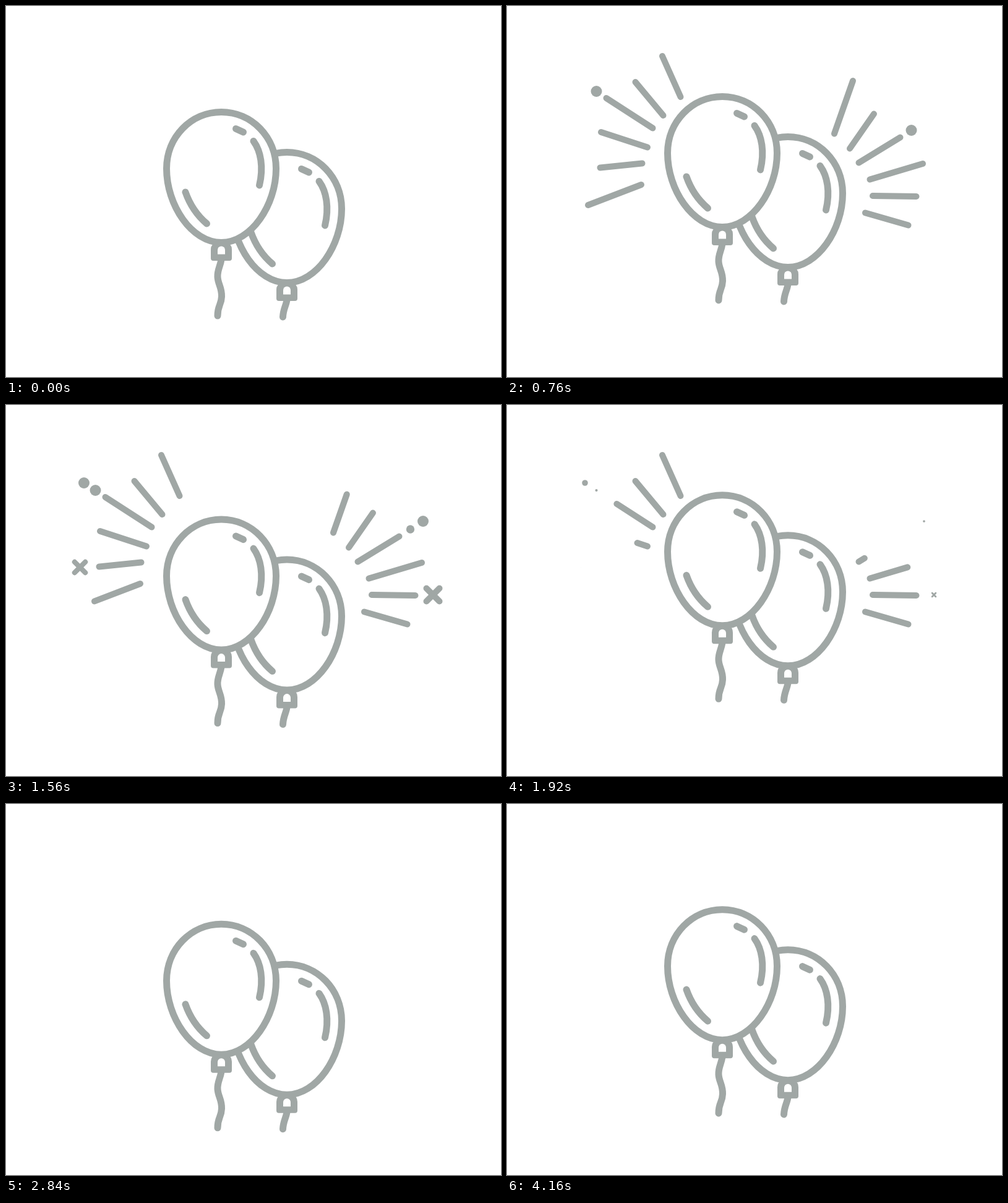
Recreate the animation shown at these times as an HTML page with a canvas. Size 800x600 px, loop 4.2 s.

```html
<!DOCTYPE html>
<html lang="en">
<head>
<meta charset="utf-8">
<title>Balloons</title>
<style>
html, body { margin: 0; width: 100%; height: 100%; overflow: hidden; background: #fff; }
canvas { display: block; }
</style>
</head>
<body>
<canvas id="stage" width="800" height="600"></canvas>
<script>
const ctx = document.getElementById('stage').getContext('2d');
const LOOP = 4200, STEP = 40, GREY = '#a0a7a5';

// Height of the balloons over time: [ms, offset]
const bob = [[0, 0], [660, -28], [1365, 25.7], [2000, -28], [2735, 25.7], [3483, -28], [4240, 0]];

// Rays run from the inner to the outer end, in order of appearance
const leftRays = [
  [217, 289, 131, 322], [218.5, 254.5, 150.5, 261.5], [227, 228.5, 152, 204],
  [235.5, 197.5, 160.5, 149], [252.5, 177, 207.5, 123], [280.5, 147, 251, 81]
];
const rightRays = [
  [529, 206.5, 559, 121], [554, 230.5, 593, 174.5], [568.5, 253.5, 635.5, 212.5],
  [586.5, 280.5, 672, 255], [591, 307, 661.5, 308], [579, 334.5, 648.5, 354.5]
];

const dots = [
  { x: 144.5, y: 138, start: 420, end: 1590 },
  { x: 126, y: 126, start: 800, end: 1690 },
  { x: 653.5, y: 201, start: 420, end: 1400 },
  { x: 674, y: 188, start: 800, end: 1580 }
];
const crosses = [
  { x: 119.5, y: 262.5, start: 920, end: 1420 },
  { x: 690, y: 307, start: 880, end: 1580 }
];

const egg = new Path2D('M259.5 263C259.5 212 299 171.5 348 171.5S436.5 212 436.5 263C436.5 322 396 382.5 348 382.5S259.5 322 259.5 263Z');
const shine = new Path2D('M371.5 198.5L383.5 204M400 218.5C412 235 416.5 261 409.5 290M290 301C297 321 308 338 324.5 352');
const knot = new Path2D('M331 394Q331 384 340 383H356Q365 384 365 394V408Q365 412 361 412H335Q331 412 331 408Z');
const hole = new Path2D('M342 401.5V394.5a6 6 0 0 1 12 0V401.5Z');
const longTail = new Path2D('M348 410C346 422 341.5 427 342 438C342.5 450 349 455 348.5 470C348 484 342 484 342 501');
const shortTail = new Path2D('M348 410C347 419 342 425 341.5 438');

const smooth = p => {
  p = Math.min(1, Math.max(0, p));
  return p * p * (3 - 2 * p);
};
const ramp = (t, start, length) => smooth((t - start) / length);
const shown = (t, start, grow, end, shrink) => ramp(t, start, grow) - ramp(t, end, shrink);

function bobAt(t) {
  const i = bob.findIndex(k => k[0] > t);
  const [t0, y0] = bob[i - 1], [t1, y1] = bob[i];
  return y0 + (y1 - y0) * smooth((t - t0) / (t1 - t0));
}

function line(x0, y0, x1, y1) {
  ctx.beginPath();
  ctx.moveTo(x0, y0);
  ctx.lineTo(x1, y1);
  ctx.stroke();
}

function drawRays(rays, t, end, gap) {
  rays.forEach(([x0, y0, x1, y1], i) => {
    const s = shown(t, i * 50, 290, end + i * gap, 290);
    if (s > 0.001) line(x0, y0, x0 + (x1 - x0) * s, y0 + (y1 - y0) * s);
  });
}

function drawDot(d, t) {
  const s = shown(t, d.start, 300, d.end, 480);
  if (s <= 0.001) return;
  ctx.beginPath();
  ctx.arc(d.x, d.y, 9 * s, 0, Math.PI * 2);
  ctx.fill();
}

function drawCross(c, t) {
  const s = shown(t, c.start, 340, c.end, 520);
  if (s <= 0.001) return;
  ctx.save();
  ctx.translate(c.x, c.y);
  ctx.scale(s, s);
  line(-10.5, -10.5, 10.5, 10.5);
  line(-10.5, 10.5, 10.5, -10.5);
  ctx.restore();
}

function drawBalloon(x, y, tail) {
  ctx.save();
  ctx.translate(x, y);
  ctx.lineWidth = 11;
  ctx.stroke(tail);
  ctx.fill(knot);
  ctx.fillStyle = '#fff';
  ctx.fill(egg);
  ctx.stroke(egg);
  ctx.fill(hole);
  ctx.stroke(shine);
  ctx.restore();
}

function draw(t) {
  ctx.fillStyle = '#fff';
  ctx.fillRect(0, 0, 800, 600);
  ctx.fillStyle = ctx.strokeStyle = GREY;
  ctx.lineCap = ctx.lineJoin = 'round';
  ctx.lineWidth = 10;
  drawRays(leftRays, t, 1492, 113);
  drawRays(rightRays, t, 1460, 119);
  dots.forEach(d => drawDot(d, t));
  crosses.forEach(c => drawCross(c, t));
  const y = bobAt(t);
  drawBalloon(106, y + 65, shortTail);
  drawBalloon(0, y, longTail);
}

const begin = performance.now();
function tick() {
  const t = (performance.now() - begin) % LOOP;
  draw(Math.floor(t / STEP) * STEP);
  requestAnimationFrame(tick);
}
tick();
</script>
</body>
</html>
```
